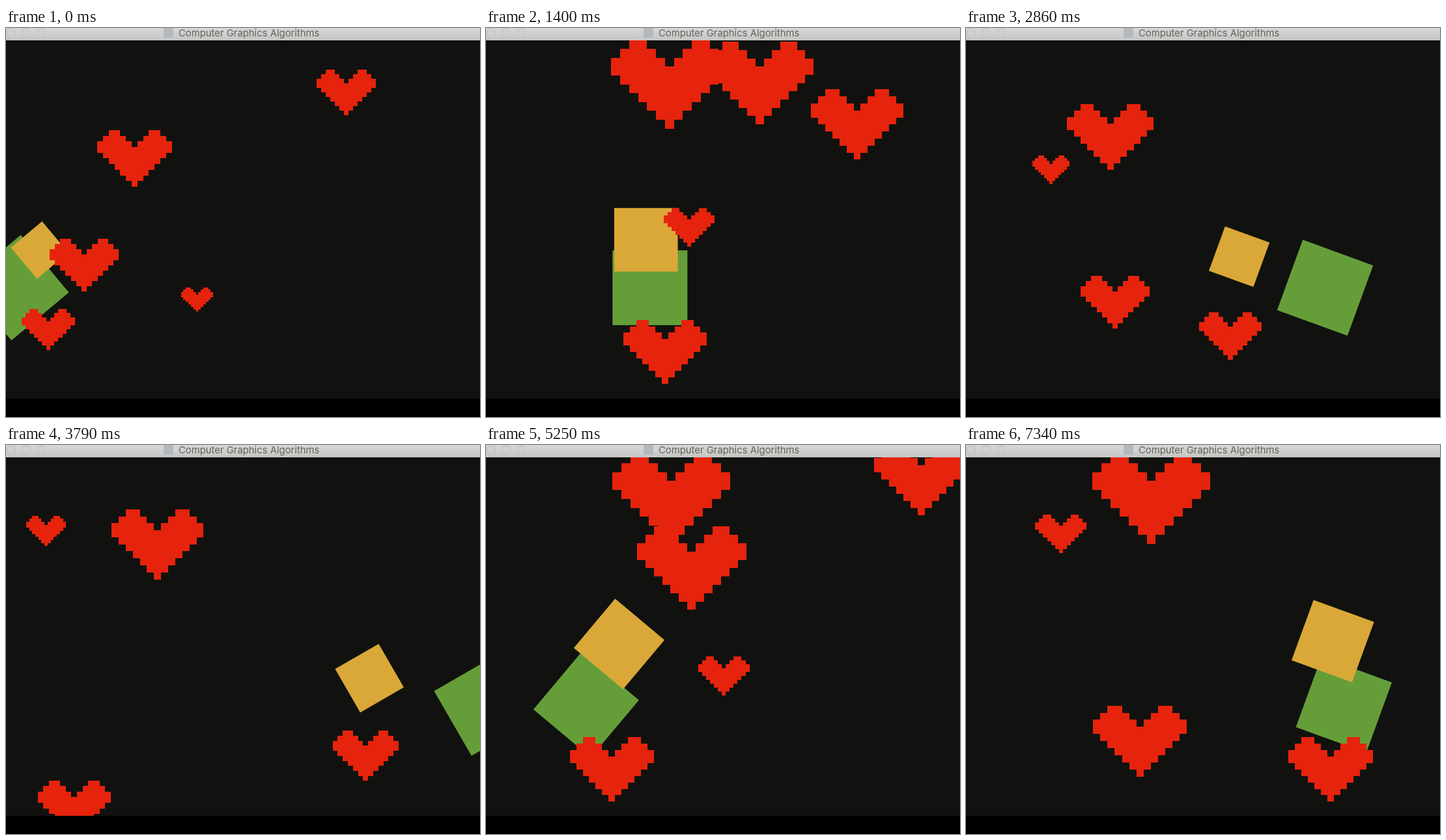
Recreate the animation shown at these times as an HTML page with a canvas. Size 728 by 598 pixels, loop 7400 ms.

```html
<!DOCTYPE html>
<html lang="en">
<head>
<meta charset="utf-8">
<title>Computer Graphics Algorithms</title>
<style>
  html, body { margin: 0; width: 100%; height: 100%; overflow: hidden; background: #000; }
  canvas { display: block; }
</style>
</head>
<body>
<canvas id="stage" width="728" height="598"></canvas>
<script>
const ctx = document.getElementById('stage').getContext('2d');
const LOOP = 7400;
const ORIGIN = { x: 47.5, y: 402.5 };
const RED = '#e6230d', GREEN = '#659e39', YELLOW = '#daa838';

const PACE = [[0, 0], [8, 20], [23, 60], [47, 125], [66, 172], [81, 214], [93, 246]];

// Spans of filled cells [row, first column, end column]
const HEART = [
  [0, 2, 4], [0, 9, 11], [1, 1, 5], [1, 8, 12], [2, 0, 6], [2, 7, 13], [3, 0, 13],
  [4, 1, 12], [5, 2, 11], [6, 3, 10], [7, 4, 9], [8, 5, 8], [9, 6, 7]
];

// Centre, velocity per tick and cell size, relative to the scaling origin
const HEARTS = [
  { x: 136.2, y: -183.7, vx: 0, vy: 0, cell: 8 },
  { x: 431.5, y: -275.9, vx: -3.115, vy: 3.125, cell: 6.35 },
  { x: 66, y: -34.4, vx: 3.675, vy: -3.668, cell: 7.43 },
  { x: 223.6, y: 13.7, vx: -1.706, vy: -1.7, cell: 3.47 },
  { x: 15.6, y: 55.4, vx: 2.845, vy: 0, cell: 5.74 }
];

function stepAt(ms) {
  if (ms < 250) return 0;
  return Math.min(93, 1 + Math.floor((ms - 241) / 76.9));
}

function tickAt(step) {
  let i = 1;
  while (i < PACE.length - 1 && step > PACE[i][0]) i++;
  const [a, ta] = PACE[i - 1], [b, tb] = PACE[i];
  return Math.round(ta + (tb - ta) * (step - a) / (b - a));
}

// Pulse between 1 and 2.02
function scaleAt(tick) {
  const m = (tick - 5 + 102) % 102;
  return 1 + 0.02 * Math.min(m, 102 - m);
}

// Travel restarts every 148 ticks
const travelAt = tick => (tick + 10) % 148 - 10;

function drawHeart(h, travel, scale) {
  const w = h.cell * scale, t = w * 0.99;
  const left = ORIGIN.x + scale * (h.x + h.vx * travel) - 6.5 * w;
  const top = ORIGIN.y + scale * (h.y + h.vy * travel) - 5 * t;
  ctx.fillStyle = RED;
  for (const [row, a, b] of HEART) {
    const x = Math.round(left + a * w), y = Math.round(top + row * t);
    ctx.fillRect(x, y, Math.round(left + b * w) - x, Math.round(top + (row + 1) * t) - y);
  }
}

function drawSquare(x, y, side, angle, shift, color) {
  ctx.save();
  ctx.translate(x, y);
  ctx.rotate(angle);
  ctx.fillStyle = color;
  ctx.fillRect(shift - side / 2, -side / 2, side, side);
  ctx.restore();
}

function drawPointer() {
  ctx.fillStyle = '#fff';
  ctx.beginPath();
  ctx.moveTo(651, 47);
  ctx.lineTo(669, 64.5);
  ctx.lineTo(651, 82);
  ctx.fill();
}

function drawTitleBar() {
  const g = ctx.createLinearGradient(0, 0, 0, 19);
  g.addColorStop(0, '#d8d8d8');
  g.addColorStop(1, '#c5c5c5');
  ctx.fillStyle = g;
  ctx.fillRect(0, 0, 728, 19);
  ctx.strokeStyle = '#bdbdbd';
  ctx.fillStyle = '#d0d0d0';
  ctx.lineWidth = 1;
  for (const x of [8, 31, 54]) {
    ctx.beginPath();
    ctx.arc(x, 6.5, 6.5, 0, Math.PI * 2);
    ctx.fill();
    ctx.stroke();
  }
  ctx.fillStyle = '#b4b9bd';
  ctx.fillRect(242, 0, 15, 15);
  ctx.fillStyle = '#626356';
  ctx.font = '14.85px Inter, "Open Sans", sans-serif';
  ctx.fillText('Computer Graphics Algorithms', 265, 12.5);
}

function draw(ms) {
  const step = stepAt(ms), tick = tickAt(step);
  const scale = scaleAt(tick), travel = travelAt(tick);
  const angle = (230 - 10 * tick) * Math.PI / 180;

  ctx.fillStyle = '#000';
  ctx.fillRect(0, 0, 728, 598);
  ctx.save();
  ctx.beginPath();
  ctx.rect(0, 19, 728, 551);
  ctx.clip();
  ctx.fillStyle = '#11120f';
  ctx.fillRect(0, 19, 728, 551);
  drawSquare(15.5 + 5.764 * travel, 399.3, 115, angle, 0, GREEN);
  drawSquare(ORIGIN.x + scale * (12.8 + 2.845 * travel), ORIGIN.y - 44.7 * scale,
    56.8 * scale, angle, 14.2 * scale, YELLOW);
  for (const h of HEARTS) drawHeart(h, travel, scale);
  if (step >= 4 && step <= 14) drawPointer();
  ctx.restore();
  drawTitleBar();
}

function frame() {
  draw(performance.now() % LOOP);
  requestAnimationFrame(frame);
}
frame();
</script>
</body>
</html>
```
